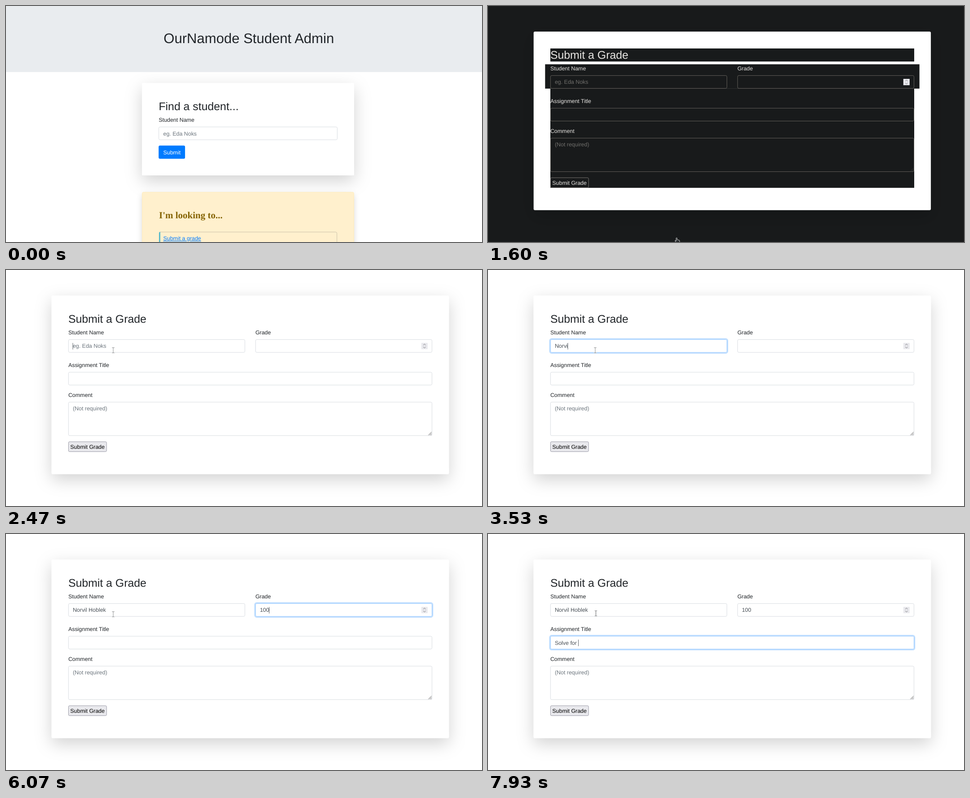
Write an HTML page that moves like this. It is 1061x528 px and loops after 8 s.

```html
<!DOCTYPE html>
<html lang="en">
<head>
<meta charset="utf-8">
<title>Student admin</title>
<style>
html, body { margin: 0; width: 100%; height: 100%; overflow: hidden; background: #fff; }
svg { display: block; width: 100%; height: 100%; }
text { font: 12.43px "Liberation Sans", Arial, sans-serif; fill: var(--ink); white-space: pre; text-rendering: geometricPrecision; }
svg { --ink: #212529; --hint: #6c757d; --value: #495057; --edge: #ced4da; --button: #e9e9ed; --buttonEdge: #8f8f9d; --buttonInk: #000; }
.dark { --ink: #e8e6e3; --hint: #706f6c; --value: #e8e6e3; --edge: #77736c; --button: #181a1b; --buttonEdge: #85827d; --buttonInk: #e8e6e3; }
.h1 { font-size: 31.07px; }
.h2 { font-size: 24.85px; }
.hint { fill: var(--hint); }
.value { fill: var(--value); }
.field { fill: none; stroke: var(--edge); stroke-width: .8; }
.night { display: none; fill: #181a1b; }
.dark .night { display: inline; }
.dark .grip { opacity: .3; }
.serif { font: bold 21px "Liberation Serif", serif; fill: #856404; }
#pointer > * { fill: #24272a; stroke: #fff; stroke-width: .8; stroke-linejoin: round; }
</style>
</head>
<body>
<svg id="stage" viewBox="0 0 1061 528" preserveAspectRatio="none">
  <defs>
    <filter id="deep" filterUnits="userSpaceOnUse" x="-100" y="-100" width="1261" height="760">
      <feDropShadow dx="0" dy="12.4" stdDeviation="18.6" flood-color="#000" flood-opacity=".175"/>
    </filter>
    <filter id="soft" filterUnits="userSpaceOnUse" x="200" y="350" width="700" height="400">
      <feDropShadow dx="0" dy="6.2" stdDeviation="6.2" flood-color="#000" flood-opacity=".15"/>
    </filter>
  </defs>
  <g id="home"></g>
  <g id="form"></g>
  <g id="pointer">
    <path id="arrow" d="M0 0L7.5 8L6.5 12L4 13.5L.2 10.5Z"/>
    <path id="hand" d="M-1.8 .8Q-.4 -.8 .6 .8V4.4L5 5.4Q6.4 5.8 6.2 7.6L5.4 12H-.6L-4 7.2Q-4.2 5.6 -2.8 6L-1.4 7Z"/>
    <path id="beam" d="M-3 -6.5H-.9L0 -6L.9 -6.5H3V-5.2H.7V5.2H3V6.5H.9L0 6L-.9 6.5H-3V5.2H-.7V-5.2H-3Z"/>
  </g>
</svg>
<script>
const LOOP = 8000, SWITCH = 1600, LIGHT = 1670;
const $ = id => document.getElementById(id);
const clamp = v => Math.min(1, Math.max(0, v));
const ease = v => v * v * (3 - 2 * v);
const mix = (a, b, k) => a.map((v, i) => v + (b[i] - v) * k);
const rgb = c => `rgb(${c.map(Math.round)})`;

const rect = (x, y, w, h, more = '') => `<rect x="${x}" y="${y}" width="${w}" height="${h}" ${more}/>`;
const text = (x, y, s, more = '') => `<text x="${x}" y="${y}" ${more}>${s}</text>`;
const box = (x, y, w, h, more = '') => rect(x + .4, y + .4, w - .8, h - .8, `rx="2.8" class="field" ${more}`);

$('home').innerHTML =
  rect(0, 0, 1061, 147.7, 'fill="#e9ecef"') +
  text(731.2, 82.8, 'OurNamode Student Admin', 'class="h1" text-anchor="end"') +
  rect(303.2, 172.6, 472.6, 206.5, 'rx="2.5" fill="#fff" filter="url(#deep)"') +
  text(340.4, 233.2, 'Find a student...', 'class="h2"') +
  text(340.4, 259.4, 'Student Name') +
  box(340.2, 270.2, 398.6, 29.5) +
  text(350.5, 289.6, 'eg. Eda Noks', 'class="hint"') +
  rect(340.2, 312.2, 58.9, 29.5, 'rx="3" fill="#007bff"') +
  text(350.5, 331.5, 'Submit', 'style="fill:#fff"') +
  rect(303.6, 416.4, 471.8, 200, 'rx="3" fill="#fff0cd" stroke="#ffeab4" stroke-width=".8" filter="url(#soft)"') +
  text(341, 474.8, "I'm looking to...", 'class="serif"') +
  rect(341.4, 505.7, 396.2, 60, 'rx="3" fill="none" stroke="#c3bda6" stroke-width=".9"') +
  '<path d="M344 505.3V528H341V508.3Q341 505.3 344 505.3Z" fill="#5bbccb"/>' +
  text(350.5, 524.2, 'Submit a grade', 'id="link" text-decoration="underline"');

const fields = [
  { x: 138.9, y: 155.2, w: 394, label: 'Student Name', hint: 'eg. Eda Noks', focus: 2470, blur: 5270, value: 'Norvil Hoblek',
    keys: [3070, 3200, 3270, 3330, 3530, 3670, 4000, 4130, 4270, 4470, 4670, 4800, 4930] },
  { x: 555.9, y: 155.2, w: 394, label: 'Grade', focus: 5270, blur: 6470, value: '100', keys: [5870, 6000, 6070] },
  { x: 138.9, y: 228.3, w: 811, label: 'Assignment Title', focus: 6470, blur: 9000, value: 'Solve for ',
    keys: [6870, 7330, 7470, 7470, 7530, 7600, 7670, 7730, 7930, 7930] },
  { x: 138.9, y: 295.2, w: 811, h: 75.8, label: 'Comment', hint: '(Not required)', focus: 9000, blur: 9000, value: '', keys: [] }
];

const fieldMarkup = ({ x, y, w, h = 29.5, label, hint = '' }, i) =>
  text(x, y - 11.1, label) +
  rect(x - 1.2, y - 1.2, w + 2.4, h + 2.4, `id="glow${i}" rx="4" fill="none" stroke="#007bff" stroke-width="2.5"`) +
  box(x, y, w, h, `id="box${i}"`) +
  text(x + 10, y + 19.2, hint, `id="hint${i}" class="hint"`) +
  text(x + 10, y + 19.2, '', `id="value${i}" class="value"`) +
  rect(0, y + 8, .9, 14.6, `id="caret${i}" class="value" fill="#495057"`);

$('form').innerHTML =
  rect(0, 0, 1061, 528, 'fill="#fff"') + rect(0, 0, 1061, 528, 'class="night"') +
  rect(101.7, 57.2, 885.4, 399.6, 'rx="3" fill="#fff" filter="url(#deep)"') +
  '<g class="night">' + rect(139, 95, 811, 29.2) + rect(127.3, 130.4, 834.4, 54.4) + rect(139, 184.5, 811, 222.3) + '</g>' +
  text(138.9, 118, 'Submit a Grade', 'class="h2"') +
  fields.map(fieldMarkup).join('') +
  rect(925.8, 163, 14, 14.2, 'fill="#e9e9ed"') +
  '<path d="M930 168.3L932.8 165.6L935.6 168.3M930 171.9L932.8 174.6L935.6 171.9" fill="none" stroke="#74747a" stroke-width="1"/>' +
  '<path class="grip" d="M941.5 369.5L948.5 362.5M944.3 369.5L948.5 365.3M947 369.5L948.5 368" stroke="#666" stroke-width="1"/>' +
  rect(139.3, 384.2, 84.9, 22.2, 'rx="2.5" style="fill:var(--button);stroke:var(--buttonEdge)" stroke-width=".9"') +
  text(143.3, 399.8, 'Submit Grade', 'style="fill:var(--buttonInk)"');

// Pointer stops: time, x, y
const path = [
  [70, 652, 62], [470, 517, 436], [670, 517, 436], [1200, 421, 518.5], [1620, 421, 518.5],
  [1670, 417, 508], [2400, 239, 179.5], [7470, 239, 179.5], [7730, 240.5, 177.5]
];

function pointerAt(t) {
  const i = path.findIndex(p => p[0] > t);
  if (i < 0) return path[path.length - 1].slice(1);
  if (!i) return path[0].slice(1);
  const a = path[i - 1], b = path[i];
  return mix(a, b, ease((t - a[0]) / (b[0] - a[0]))).slice(1);
}

const inside = (x, y, f) => x > f.x && x < f.x + f.w && y > f.y && y < f.y + (f.h || 29.5);
const show = (el, on) => { el.style.display = on ? '' : 'none'; };

function drawPointer(t) {
  const [x, y] = pointerAt(t);
  const home = t < SWITCH;
  const overLink = home && y > 513 && x < 436;
  const overField = home ? inside(x, y, { x: 340, y: 270, w: 399 }) : fields.some(f => inside(x, y, f));
  const kind = overLink || (t >= SWITCH && t < LIGHT) ? 'hand' : overField ? 'beam' : 'arrow';
  for (const id of ['arrow', 'hand', 'beam']) show($(id), id === kind);
  show($('pointer'), t >= 70);
  $('pointer').setAttribute('transform', `translate(${x} ${y})`);
  $('link').style.fill = overLink ? '#0056b3' : '#007bff';
}

function drawField(f, i, t) {
  const lit = ease(clamp((t - f.focus) / 150)) * (1 - ease(clamp((t - f.blur) / 150)));
  const count = f.keys.filter(k => k <= t).length;
  const value = $('value' + i), caret = $('caret' + i);
  value.textContent = f.value.slice(0, count);
  show($('hint' + i), !count);
  $('glow' + i).setAttribute('stroke-opacity', .25 * lit);
  const rest = mix([92, 92, 96], [206, 212, 218], ease(clamp((t - LIGHT) / 150)));
  $('box' + i).style.stroke = t < LIGHT ? '' : rgb(mix(rest, [128, 189, 255], lit));
  const lastAct = count ? f.keys[count - 1] : f.focus;
  const focused = t >= f.focus && t < f.blur;
  show(caret, focused && (t - lastAct) % 1060 < 530);
  if (focused) caret.setAttribute('x', f.x + 9.6 + (count ? value.getComputedTextLength() : 0));
}

function draw(t) {
  const home = t < SWITCH;
  show($('home'), home);
  show($('form'), !home);
  $('form').classList.toggle('dark', t < LIGHT);
  if (!home) fields.forEach((f, i) => drawField(f, i, t));
  drawPointer(t);
}

const start = performance.now();
function tick() {
  draw((performance.now() - start) % LOOP);
  requestAnimationFrame(tick);
}
tick();
</script>
</body>
</html>
```
